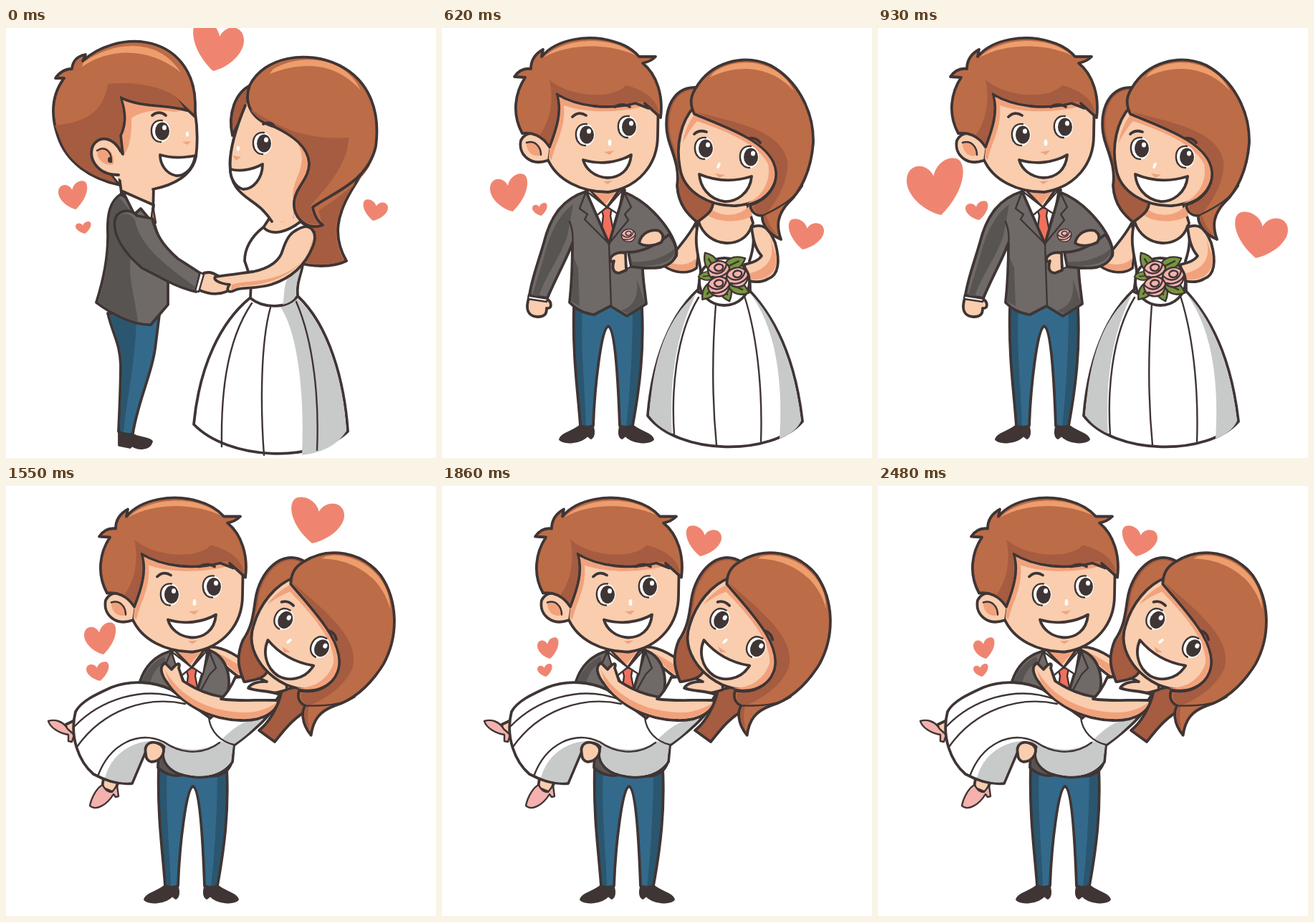
An HTML page that plays this animation: 600x600 px, repeating every 2790 ms.

```html
<!DOCTYPE html>
<html lang="en">
<head>
<meta charset="utf-8">
<title>Wedding couple</title>
<style>
html, body { margin: 0; width: 100%; height: 100%; overflow: hidden; background: #fff; }
svg { display: block; width: 100%; height: 100%; }
path, ellipse { fill: none; }
.o { stroke: #3f3534; stroke-width: 3.8; stroke-linejoin: round; stroke-linecap: round; }
.i { stroke: #3f3534; stroke-width: 2.4; stroke-linejoin: round; stroke-linecap: round; }
.h { fill: #bc6c47; } .hd { fill: #a55c40; } .hl { fill: #ee9d6c; }
.s { fill: #f9cdae; } .sd { fill: #f1a27c; }
.j { fill: #6f6a67; } .jd { fill: #585452; }
.t { fill: #336a8b; } .td { fill: #2b566f; }
.w { fill: #fff; } .g { fill: #c8c9c9; } .k { fill: #3f3534; }
.r { fill: #ef8571; } .tie { fill: #f0705c; } .p { fill: #f4b1ae; } .l { fill: #77963f; }
</style>
</head>
<body>
<svg viewBox="0 0 600 600">
<defs>
  <path id="heart" class="r" d="M.6 1C.3.93 0 .66 0 .4C0 .1.34.06.47.32C.51.1.72-.04.88.02C1.06.1 1.03.58.6 1z"/>

  <g id="eye">
    <ellipse class="w" rx="13" ry="15.5"/>
    <path class="i" d="M2 -15C-9 -16 -14 -8 -13 2C-12 10 -7 15 0 15"/>
    <ellipse class="k" cx="2" rx="10" ry="12.5"/>
    <ellipse class="w" cx="5" cy="-5" rx="3" ry="3.6"/>
  </g>

  <g id="groomSide">
    <path class="s" d="M160 95L263 118C268 145 267 165 265 180C262 205 238 220 205 224C180 222 160 215 145 200L140 160z"/>
    <path class="sd" d="M160 97C190 112 225 107 253 115L235 117C205 112 185 118 175 126C176 150 172 170 163 178L160 150C168 130 166 115 160 97z"/>
    <path class="o" d="M264 118C268 145 267 165 265 180C260 205 235 219 205 225"/>
    <path class="h o" d="M158 219C118 210 84 188 72 150C62 120 64 93 81 70L69 70C76 60 85 57 92 57C93 46 100 39 111 37L107 46C130 25 165 15 195 20C237 27 263 60 264 105L264 124L237 99L252 115C225 106 190 112 160 97C168 120 167 135 160 150L163 176C155 165 140 155 140 157L130 185z"/>
    <path class="hd" d="M68 136C110 132 136 118 142 78C180 74 220 82 238 97L249 112C225 104 190 110 158 94C166 120 165 135 158 150L160 172L140 157L130 185L154 216C118 208 84 186 74 150z"/>
    <path class="hl" d="M108 48C150 18 212 12 244 62C205 30 150 24 106 54z"/>
    <path class="s o" d="M160 172C150 153 132 149 122 163C113 180 126 205 157 205"/>
    <path class="sd" d="M150 190C152 172 138 161 128 170C124 182 138 194 150 190z"/>
    <path class="i" d="M127 171C139 163 148 174 147 187"/>
    <ellipse class="k" cx="145" cy="184" rx="3" ry="4"/>
    <use href="#eye" x="216" y="144"/>
    <path class="o" d="M204 122C210 117 217 117 223 122"/>
    <path class="sd" d="M246 159L258 158L253 163z"/>
    <ellipse class="w" cx="253" cy="148" rx="2" ry="3.5"/>
    <path class="w o" d="M215 177C232 182 250 181 264 178C262 195 250 207 237 206C223 203 215 190 215 177z"/>
  </g>

  <g id="brideSide">
    <path class="hd o" d="M341 80C320 90 309 120 316 150C325 130 335 118 345 105z"/>
    <path class="s" d="M338 100C308 165 308 200 321 222C333 240 354 242 371 270L400 270L403 235C412 215 426 195 425 175L380 130z"/>
    <path class="sd" d="M340 112C350 132 385 132 402 155C420 175 412 195 403 217C397 235 403 250 402 262L400 240C412 215 428 195 425 170L380 130z"/>
    <path class="o" d="M334 108C308 170 308 203 321 222C333 240 353 242 371 270"/>
    <path class="h o" d="M340 80C360 40 420 30 465 52C510 75 522 120 516 165C505 215 455 230 428 250C430 262 435 270 442 275C420 283 400 265 402 242C404 222 424 210 423 188C421 165 400 150 375 138C346 130 330 108 340 80z"/>
    <path class="hd" d="M341 113C375 134 410 157 478 153C478 190 445 225 425 248C427 262 431 269 437 273C418 277 403 262 404 243C406 223 426 211 425 188C423 164 400 148 375 136C358 131 346 123 341 113z"/>
    <path class="hl" d="M372 58C410 34 474 40 495 87C463 51 420 44 368 64z"/>
    <use href="#eye" x="358" y="161"/>
    <path class="o" d="M359 134C365 131 371 132 375 138"/>
    <path class="sd" d="M316 178L328 180L321 185z"/>
    <ellipse class="w" cx="324" cy="168" rx="2" ry="3.5"/>
    <path class="w o" d="M313 197C328 201 345 197 358 190C358 210 345 225 331 225C320 222 313 210 313 197z"/>
  </g>

  <g id="groomFront">
    <path class="s o" d="M155 95L147 182C160 213 195 229 232 229C275 222 301 190 301 150L302 95z"/>
    <path class="sd" d="M160 94C190 114 235 115 272 106L285 108C255 118 205 120 170 108C173 140 158 160 153 184L149 180L151 165C161 140 168 115 160 94z"/>
    <path class="s o" d="M150 165C140 145 118 141 110 157C106 177 124 193 147 185"/>
    <path class="sd" d="M140 176C138 162 124 153 118 162C118 174 130 183 140 176z"/>
    <path class="i" d="M118 160C130 156 138 166 138 177"/>
    <path class="h o" d="M101 68C108 58 117 56 124 57C124 45 130 36 141 30L139 40C160 15 205 8 240 19C258 24 268 32 275 40L298 40C292 46 286 48 280 49C300 65 309 95 305 125L283 105L288 112L270 105C235 114 190 111 160 92C168 115 160 140 150 166C140 150 125 145 112 147C97 120 102 90 116 69z"/>
    <path class="hd" d="M150 72C175 95 235 102 257 80C280 86 300 98 303 119L283 103L270 103C235 112 190 109 158 89C166 115 158 140 149 162C146 156 141 152 136 150C152 128 156 98 150 72z"/>
    <path class="hl" d="M142 41C170 13 238 9 270 38C235 22 180 20 142 41z"/>
    <use href="#eye" x="200" y="149"/>
    <use href="#eye" x="259" y="138"/>
    <path class="o" d="M182 124C188 118 195 118 201 122M241 110C248 106 256 106 262 110"/>
    <path class="sd" d="M226 173L240 171L234 177zM225 214L238 213L231 218z"/>
    <ellipse class="w" cx="234" cy="160" rx="2.4" ry="4.5"/>
    <path class="w o" d="M197 184C220 191 245 188 264 177C262 200 246 209 231 209C212 208 200 196 197 184z"/>
  </g>

  <g id="brideFront">
    <path class="hd o" d="M356 83C318 80 305 125 318 162C326 185 331 200 328 220C330 248 344 261 356 271C368 262 380 255 378 240L352 120z"/>
    <path class="h" d="M353 87C325 84 311 120 320 155C330 180 332 205 331 225C334 200 328 172 330 152C334 130 343 118 350 108z"/>
    <path class="s o" d="M352 110C333 130 326 165 332 195C337 230 375 249 410 248C445 245 467 225 466 195C455 160 410 140 352 110z"/>
    <path class="sd" d="M353 120C345 130 338 145 336 160C342 148 350 136 356 130C400 145 442 163 455 190C460 215 445 237 425 245C450 240 466 222 466 195C455 160 400 140 353 120z"/>
    <path class="h o" d="M354 84C375 48 420 35 458 52C495 72 519 115 518 160C515 200 500 228 484 243C468 260 466 275 473 295C452 286 446 270 447 262C437 262 431 256 430 247C455 240 468 220 466 200C462 160 400 140 352 120C345 105 347 95 354 84z"/>
    <path class="hd" d="M354 117C410 132 472 142 482 185C484 212 470 237 452 260C455 272 460 280 467 288C454 282 449 272 449 260C441 260 435 256 434 249C458 239 470 220 468 200C464 160 400 138 354 117z"/>
    <path class="i" d="M447 262C472 250 492 238 503 220"/>
    <path class="hl" d="M378 63C410 38 470 44 491 88C463 55 415 48 374 69z"/>
    <use href="#eye" x="366" y="168"/>
    <use href="#eye" x="429" y="180"/>
    <path class="o" d="M352 148C357 143 363 143 369 145M428 154C434 153 440 155 444 160"/>
    <path class="sd" d="M381 203L395 205L387 209zM389 239L403 239L396 242z"/>
    <ellipse class="w" cx="386" cy="192" rx="2" ry="4.5" transform="rotate(20 386 192)"/>
    <path class="w o" d="M359 204C385 215 410 214 432 207C430 231 410 243 394 242C372 239 360 221 359 204z"/>
  </g>

  <g id="shoe"><path class="k o" d="M194 554L210 556C212 564 211 570 208 572L203 568C192 580 170 579 165 574C168 565 187 563 194 554z"/></g>
  <g id="legs">
    <use href="#shoe"/>
    <use href="#shoe" transform="translate(459) scale(-1 1)"/>
    <path class="t" d="M184 390C182 460 190 510 193 555Q202 559 211 555C213 500 222 420 232 416C242 420 246 500 248 555Q257 559 266 555C276 500 282 450 279 390z"/>
    <path class="td" d="M184 390L196 390C193 450 200 510 201 557L193 555C190 510 182 460 184 390zM279 390L266 390C266 450 262 510 257 557L266 555C276 500 282 450 279 390z"/>
    <path class="o" d="M184 390C182 460 190 510 193 555Q202 559 211 555C213 500 222 420 232 416C242 420 246 500 248 555Q257 559 266 555C276 500 282 450 279 390"/>
  </g>
  <g id="shirt">
    <path class="w o" d="M201 226L232 302L255 226z"/>
    <path class="s o" d="M203 222L230 251L250 222z"/>
    <path class="sd" d="M206 224L228 246L247 224z"/>
    <path class="tie i" d="M222 251L237 251L235 262L240 288L232 302L222 286L225 262z"/>
    <path class="w i" d="M202 228L213 264L230 250zM252 226L246 260L231 250z"/>
  </g>
  <g id="rose">
    <path class="p i" d="M-15 1C-15-12 4-17 11-9C19-4 14 12 4 14C-7 16-14 9-15 1z"/>
    <path class="i" d="M-14-1C-5 8 8 6 11-8M-6-4C-3-11 8-9 6-3C3 3-5 2-6-4M-9 9C0 12 11 6 14 0"/>
  </g>
  <path id="leaf" class="l i" d="M0 0C4-12 18-14 32-4C22 9 8 10 0 0L22-3"/>
</defs>

<g class="scene">
  <path class="h o" d="M500 90C530 150 505 190 483 225C462 260 455 290 475 325C455 335 425 333 405 327L400 190z"/>
  <path class="hd" d="M512 180C505 210 465 235 436 255L442 275C432 280 425 278 420 276L412 325C430 331 455 332 471 324C452 290 460 258 482 224C495 207 506 195 512 180z"/>
  <path class="k o" d="M158 565L176 567C184 573 200 572 203 577C200 588 184 588 176 582L173 585L158 582z"/>
  <path class="t o" d="M142 398C150 430 159 440 160 470C160 500 158 540 157 563Q167 569 177 566C184 520 205 480 209 440L214 400z"/>
  <path class="td" d="M145 400C153 430 161 440 162 470C162 500 160 540 159 562L164 564C168 520 180 470 182 410z"/>
  <path class="s o" d="M158 200C158 215 161 224 161 232L205 262L206 222z"/>
  <path class="j o" d="M160 232C146 241 141 258 142 285C143 320 135 355 126 383C150 401 180 415 202 414L226 386L226 350L212 290L203 260z"/>
  <path class="jd" d="M158 236C147 245 143 260 144 285C145 320 138 355 129 382C148 396 165 405 184 410C180 375 170 350 174 320L185 270z"/>
  <path class="w o" d="M163 228L206 247L203 270L188 252L179 260z"/>
  <path class="tie i" d="M205 248L209 272L203 264z"/>
  <path class="s o" d="M272 344C285 336 295 345 309 355Q315 364 307 368C295 373 281 371 268 365z"/>
  <path class="j o" d="M204 266C210 288 217 302 240 322L271 342L265 368C235 361 215 347 190 335C163 312 149 288 152 268C155 255 172 250 183 262z"/>
  <path class="jd" d="M154 270C156 258 170 254 180 268C185 295 205 320 264 361L263 365C235 359 215 345 191 333C165 311 151 288 154 270z"/>
  <path class="w i" d="M271 341L276 344L269 368L264 367z"/>
  <use href="#groomSide"/>
  <path class="s o" d="M371 260L358 280C375 300 405 290 415 268L402 240z"/>
  <path class="sd" d="M366 248C376 256 390 255 401 247L402 265C387 275 376 270 371 263z"/>
  <path class="w o" d="M340 377C300 410 270 470 262 553C310 603 430 608 477 563C472 490 450 415 408 375z"/>
  <path class="g" d="M382 388C405 420 417 500 413 596C440 593 463 582 475 562C470 490 448 415 406 377z"/>
  <path class="i" d="M343 384C305 440 300 520 301 584M369 390C355 440 355 530 360 596M405 382C430 440 437 520 434 589"/>
  <path class="w o" d="M359 278C344 290 333 305 333 325C341 345 343 360 341 377C360 392 392 392 407 374C405 355 412 345 414 330L430 285L411 270C395 283 372 292 359 278z"/>
  <path class="g" d="M412 332L400 340C385 355 390 370 386 386Q400 383 405 373C403 355 410 345 412 332z"/>
  <path class="s o" d="M407 281C425 270 436 285 428 305C416 335 395 350 370 358C345 365 327 361 319 366C309 371 307 365 312 358C302 357 288 353 292 347C310 345 330 342 345 340C368 335 382 325 386 310C391 295 396 286 407 281z"/>
  <path class="sd" d="M429 292C424 325 398 342 370 349C345 355 330 353 315 358L314 366L328 360C345 360 400 355 422 312z"/>
  <use href="#brideSide"/>
</g>

<g class="scene">
  <path class="h o" d="M508 70C530 140 495 165 497 205C500 240 508 254 527 259C500 286 440 291 415 278C400 270 394 255 390 240L440 150z"/>
  <path class="hd" d="M496 180C470 205 468 220 481 238C470 245 455 240 448 232L395 248C402 271 425 281 455 281C485 280 507 272 521 261C492 248 493 215 496 180z"/>
  <path class="k o" d="M128 536L118 527L112 529C117 539 105 547 98 560C99 569 110 568 114 562L128 552z"/>
  <path class="k o" d="M273 547L289 549C295 557 313 556 315 564C308 571 292 569 285 562L280 566L270 564z"/>
  <path class="t o" d="M167 464C172 500 180 520 190 527C165 530 140 535 124 536L126 552C160 559 215 561 230 552C238 540 236 510 238 497C255 490 270 490 276 494C278 520 275 535 272 547L290 550C300 520 319 490 317 470C315 455 290 447 250 449z"/>
  <path class="td" d="M169 468C174 500 182 520 196 526C199 505 210 488 240 489L238 495C255 490 268 488 277 492C281 515 278 530 275 546L282 547C285 515 300 485 290 475C270 467 255 472 237 484zM126 540C150 545 180 547 205 542L192 528C165 532 140 537 126 540z"/>
  <path class="s o" d="M181 300L186 325L232 358L238 320z"/>
  <path class="j o" d="M186 326C170 345 169 380 173 400C172 430 169 450 166 462C190 475 215 482 240 484L254 455L253 415L236 358z"/>
  <path class="jd" d="M183 332C172 348 171 380 175 400C174 430 171 450 169 460C182 467 195 473 209 476C203 445 215 425 205 400z"/>
  <path class="w o" d="M188 321L234 337L230 366L215 350L209 356z"/>
  <path class="tie i" d="M234 341L244 388L229 364z"/>
  <path class="s o" d="M301 350L309 340C312 331 321 327 327 332L350 338L353 347C340 348 335 345 330 352L316 366z"/>
  <path class="j o" d="M178 366C182 350 205 352 218 372L241 390L299 351L314 376L256 425C238 436 219 427 210 420C190 400 176 381 178 366z"/>
  <path class="jd" d="M181 366C184 356 200 360 209 378C220 407 240 414 260 402L309 365L312 375L255 423C238 433 220 425 211 418C192 398 179 381 181 366z"/>
  <path class="w i" d="M298 350L303 347L317 370L311 375z"/>
  <use href="#groomSide" transform="translate(160 287) rotate(-11) translate(-137 -180)"/>
  <path class="s o" d="M414 240L419 262C435 272 450 255 457 243L435 220z"/>
  <path class="w o" d="M390 365C350 400 320 470 313 536C345 587 485 592 527 545C520 480 500 400 455 356z"/>
  <path class="g" d="M436 367C460 420 461 510 457 575C490 572 512 562 525 544C518 480 498 402 454 359z"/>
  <path class="i" d="M393 371C355 430 350 510 353 566M420 371C405 440 408 510 410 576M452 361C485 430 486 510 485 570"/>
  <path class="w o" d="M417 258C395 275 382 295 384 320C392 335 393 350 390 365C410 373 440 370 456 355C455 340 462 320 468 290L469 262L456 243C442 261 430 266 417 258z"/>
  <path class="g" d="M463 297L451 310C435 327 441 350 436 366Q449 362 454 354C453 338 459 320 463 297z"/>
  <path class="s o" d="M450 262C468 260 471 280 460 295C440 320 400 340 363 345C357 353 350 356 350 348L352 339C335 342 325 338 322 333C340 326 365 324 385 320C410 312 425 300 430 285C435 270 440 264 450 262z"/>
  <path class="sd" d="M464 271C464 300 410 332 366 334L354 339L354 350L362 343C400 338 440 318 459 293z"/>
  <use href="#brideSide" transform="translate(366 161) rotate(-19) translate(-358 -161)"/>
</g>

<g class="scene">
  <use href="#legs"/>
  <use href="#shirt"/>
  <path class="s o" d="M354 272C345 290 330 305 322 317L310 332C325 343 345 343 355 335L360 300z"/>
  <path class="sd" d="M312 331C325 341 345 341 354 333L354 322C342 332 328 332 316 326z"/>
  <path class="s o" d="M121 377C117 390 118 402 133 403C146 403 146 396 146 391C154 392 153 383 148 379z"/>
  <path class="w i" d="M121 372L148 376L146 382L120 378z"/>
  <path class="j o" d="M201 228C170 238 152 260 142 300C135 325 125 350 122 373L147 377C158 350 175 320 182 300C182 340 180 365 178 383C190 395 200 398 212 400L235 388L258 402L285 385C283 365 280 350 280 335C295 335 320 332 327 318C332 295 295 245 254 229L233 301z"/>
  <path class="jd" d="M183 246C160 262 148 295 142 320L126 373L135 374C145 345 165 320 175 290zM184 320L181 382L192 388L190 335zM281 378L283 384L260 399L250 394C270 388 274 372 272 350z"/>
  <path class="i" d="M201 228L192 252L203 260L199 267L233 301L236 388M254 229L264 250L255 260L260 268L233 301M178 270Q184 285 182 300"/>
  <path class="w i" d="M254 313L260 312L264 333L258 336z"/>
  <path class="s o" d="M256 314C244 311 233 318 235 326L240 325Q235 341 247 342L257 338z"/>
  <path class="j o" d="M260 313C280 313 300 302 317 288C333 310 330 327 305 334C290 336 272 334 264 333z"/>
  <path class="jd" d="M264 326C285 328 312 321 325 307C326 330 292 334 265 331z"/>
  <path class="s o" d="M275 300C278 286 291 280 303 283Q312 290 306 299C295 305 282 305 275 300z"/>
  <use href="#rose" transform="translate(260 289) scale(.65)"/>
  <use href="#groomFront"/>
  <path class="s o" d="M372 235L356 270C365 310 428 312 434 272L424 240z"/>
  <path class="sd" d="M371 248C385 265 415 265 430 247L433 262C410 275 375 270 366 256z"/>
  <path class="w o" d="M356 366C310 410 292 480 287 541C330 597 460 598 503 549C495 480 475 415 428 365z"/>
  <path class="g" d="M345 380C305 420 294 480 289 540C297 552 308 560 321 566C317 500 325 430 354 372zM430 370C466 420 476 490 471 573C487 567 497 558 501 548C493 480 470 410 430 370z"/>
  <path class="i" d="M358 376C325 430 320 510 324 568M382 386C377 450 377 520 383 582M422 374C443 440 447 520 445 577"/>
  <path class="w o" d="M358 270C350 300 359 320 361 340L357 368C380 380 410 378 430 367L429 325C436 305 436 290 432 276C422 310 370 308 358 270z"/>
  <path class="s o" d="M432 278C447 272 456 278 465 300C472 325 470 345 455 350C445 356 430 355 424 350L422 330C432 328 442 324 446 318C437 308 434 295 432 278z"/>
  <path class="sd" d="M456 288C466 315 460 336 426 343L427 350C442 354 468 349 467 320z"/>
  <ellipse class="w o" cx="394" cy="354" rx="35" ry="33"/>
  <use href="#leaf" transform="translate(384 341) rotate(-115)"/>
  <use href="#leaf" transform="translate(394 335) rotate(-18)"/>
  <use href="#leaf" transform="translate(384 354) rotate(137)"/>
  <use href="#leaf" transform="translate(390 351) rotate(77)"/>
  <use href="#leaf" transform="translate(399 356) rotate(32)"/>
  <use href="#leaf" transform="translate(380 345) rotate(182) scale(.7)"/>
  <use href="#rose" x="386" y="338"/>
  <use href="#rose" x="412" y="347"/>
  <use href="#rose" x="386" y="360"/>
  <use href="#brideFront"/>
</g>

<g class="scene">
  <use href="#legs" transform="translate(29 3)"/>
  <path class="hd o" d="M385 285C380 310 365 332 353 341L375 357C385 345 400 322 427 310L430 275z"/>
  <path class="s o" d="M281 225C300 222 330 238 350 262L343 278C322 268 300 245 281 232z"/>
  <path class="sd" d="M290 230C310 240 330 252 347 264L343 274C322 264 304 246 290 230z"/>
  <path class="j o" d="M231 230C205 237 192 255 186 276L240 300L300 310C320 280 312 238 283 229z"/>
  <path class="jd" d="M221 238C205 245 195 258 189 274L200 278C204 262 212 250 223 246z"/>
  <use href="#shirt" transform="translate(29 3)"/>
  <path class="i" d="M231 230L221 253L231 261L260 303M283 229L293 254L284 263L262 303"/>
  <path class="jd o" d="M213 370L212 393C225 405 240 406 250 402L262 396L280 405C300 406 310 398 314 388L310 360z"/>
  <path class="s o" d="M83 333L100 325L98 350L86 345z"/>
  <path class="p i" d="M59 328C68 325 80 328 86 339L95 347L92 357L87 356L87 347C75 345 62 338 59 328z"/>
  <path class="s o" d="M136 408L157 412L151 428L134 421z"/>
  <path class="p i" d="M117 446C120 432 128 420 135 417Q139 427 148 427L155 418L157 433L153 434L150 430C141 445 125 454 117 446z"/>
  <path class="w o" d="M97 315C105 300 125 291 147 281C175 270 207 273 230 284L285 324C302 308 313 288 320 267L343 263C360 288 378 283 382 292C378 315 345 342 318 362L316 385C300 408 268 411 240 401C225 395 215 380 221 364C215 355 200 355 193 375L176 415C155 417 135 409 122 402C102 385 88 350 97 315z"/>
  <path class="g" d="M138 407C148 372 180 350 222 357C252 375 285 367 300 356L317 362L314 384C300 406 268 409 241 399C225 393 217 380 223 364C215 353 198 355 191 375L175 413C160 415 148 411 138 407zM301 354C312 342 325 332 342 326L358 326C344 340 331 352 317 361z"/>
  <path class="i" d="M96 335C130 300 190 276 248 298M99 364C135 313 195 292 250 304M128 405C145 359 185 341 220 357C250 378 280 372 298 358M283 323C285 343 300 357 318 361"/>
  <path class="s o" d="M195 374C192 360 202 354 214 360C227 368 217 384 203 385Q195 383 195 374z"/>
  <path class="s o" d="M341 255C350 270 345 277 337 280C352 292 375 291 392 284L390 260z"/>
  <path class="s o" d="M381 291C381 315 360 328 328 327C285 326 246 305 226 276C215 262 214 251 222 247L231 256C239 246 244 246 241 254L247 272C275 291 310 304 381 291z"/>
  <path class="sd" d="M221 255C240 292 280 314 330 316C350 317 367 310 378 302C372 319 350 325 328 325C285 324 248 304 228 276z"/>
  <path class="w o" d="M300 297C310 288 316 276 320 267L345 265C355 268 360 272 364 273C352 272 341 276 338 282C350 287 368 285 382 291L377 299C350 298 325 301 300 297z"/>
  <use href="#groomFront" transform="translate(29 2.5)"/>
  <use href="#brideFront" transform="translate(388 186) rotate(27) translate(-366 -168)"/>
</g>
<g id="hearts"></g>
</svg>
<script>
const STEP = 310;
const scenes = document.querySelectorAll('.scene');
const layer = document.getElementById('hearts');

// Each heart: x, y, width, height, mirrored
const sets = [
  [[260, -11, 72, 71, 1], [73, 213, 41, 40], [97, 270, 22, 17], [498, 239, 35, 30, 1]],
  [[218, 54, 70, 69], [100, 322, 40, 40], [131, 363, 21, 18]],
  [[67, 203, 53, 53], [126, 244, 21, 18], [483, 266, 50, 43, 1]],
  [[40, 181, 80, 80], [122, 241, 32, 27], [497, 256, 75, 65, 1]],
  [[340, 55, 50, 43, 1], [133, 211, 30, 30], [133, 248, 21, 18]],
  [[397, 15, 75, 65, 1], [109, 190, 45, 45], [112, 245, 32, 27]]
];
const beats = [[0, 0], [1, 1], [2, 2], [2, 3], [3, 4], [3, 5], [3, 4], [3, 5], [3, 4]];

const heart = ([x, y, w, h, flip]) =>
  `<use href="#heart" transform="translate(${flip ? x + w : x} ${y}) scale(${flip ? -w : w} ${h})"/>`;

let shown = -1;
function draw(now) {
  const beat = Math.floor(now / STEP) % beats.length;
  if (beat !== shown) {
    shown = beat;
    const [scene, set] = beats[beat];
    scenes.forEach((el, i) => el.style.display = i === scene ? '' : 'none');
    layer.innerHTML = sets[set].map(heart).join('');
  }
}
function tick() {
  draw(performance.now());
  requestAnimationFrame(tick);
}
tick();
</script>
</body>
</html>
```
